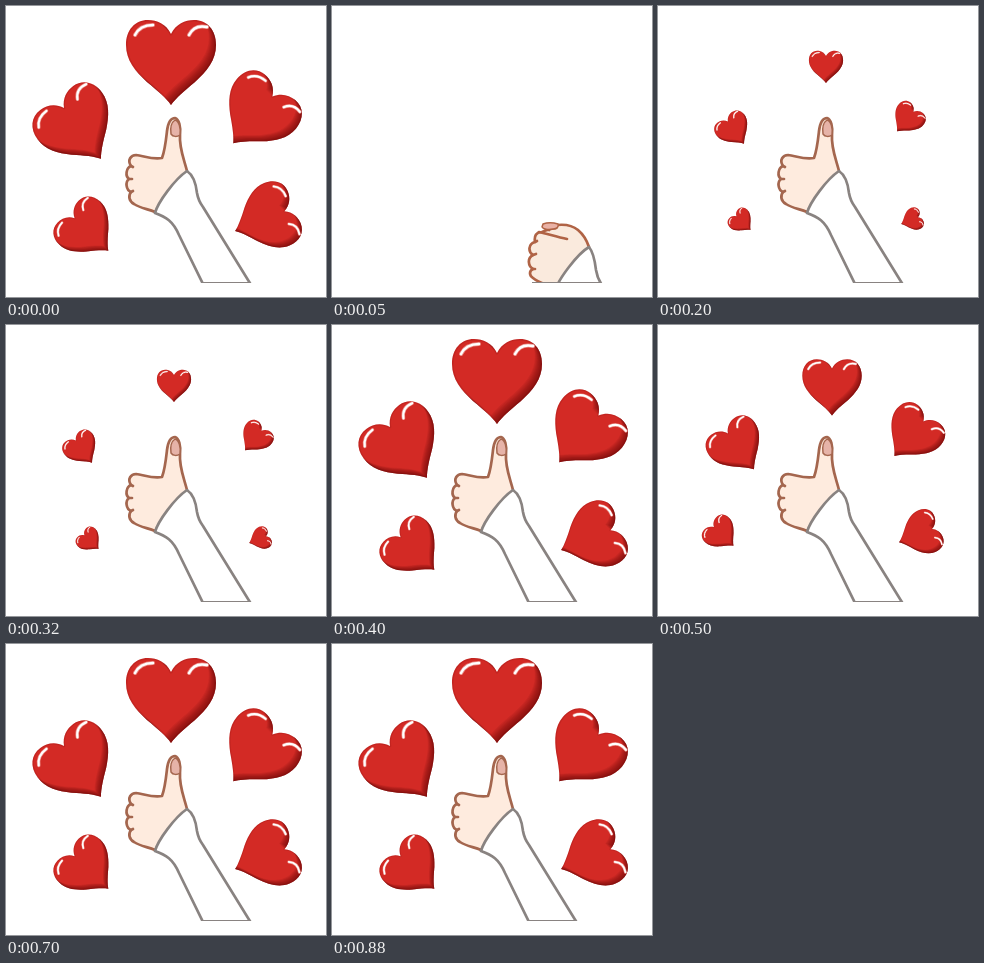
Animation of 320x291 px, one loop 1000 ms. Source, as an HTML page with a canvas:

```html
<!DOCTYPE html>
<html lang="en">
<head>
<meta charset="utf-8">
<title>Thumbs up with hearts</title>
<style>
html, body { margin: 0; width: 100%; height: 100%; overflow: hidden; background: #fff; }
canvas { display: block; width: 320px; height: 291px; }
</style>
</head>
<body>
<canvas id="stage" width="320" height="291"></canvas>
<script>
const ctx = document.getElementById('stage').getContext('2d');
const LOOP = 1000, FLOOR = 277;

// Hearts clockwise from the top: x, y, scale
const TILT = [0, 40, 68, -46, -36];
const BIG = [[165, 56, 1], [251, 109, .857], [259, 213, .75], [81.9, 225, .66], [72.6, 122, .885]];
const MEDIUM = [[174, 62, .66], [254, 110, .635], [261, 209.3, .5], [63.7, 209.5, .38], [80.2, 122.6, .625]];
const SMALL = [[168, 60.6, .38], [249, 113.4, .358], [253.4, 214, .255], [84, 215.8, .275], [76.3, 124.3, .385]];

const HEART = new Path2D('M0-28C5-38 14-42 23-42C36-42 45-32 45-17C45-2 36 9 24 20C13 29 5 36 0 43C-5 36-13 29-24 20C-36 9-45-2-45-17C-45-32-36-42-23-42C-14-42-5-38 0-28Z');
const SHINE = new Path2D('M-36-27C-33-33-27-37-18-37M18-27C21-33 27-37 36-35');

const THUMB = {
  skin: '#feebde', ink: '#a4664e', nail: '#e6b3a8', cuffInk: '#898381',
  hand: new Path2D('M149 206C142 203 134 202 128 198C123 195 122 190 125 186C120 184 119 176 123 173C119 170 120 162 125 160C121 154 125 149 130 149C138 150 147 154 156 152C159 144 160 134 161 125C162 117 165 112 169 112C173 113 175 121 174 129C173 142 178 153 181 165L168 185Z'),
  lines: new Path2D('M125 160L127 161M123 173L126 173M125 186L127 185'),
  nailPath: new Path2D('M169 114C173 115 175 122 174 129C171 131 167 131 165 128C164 121 166 116 169 114Z'),
  arm: new Path2D('M181 165C187 169 190 178 191 187C192 193 194 197 197 201L244.5 278H197L173 229C167 215 160 211 149 207C152 196 169 173 181 165Z'),
  base: [196, 243]
};

const FIST = {
  skin: '#faeadd', ink: '#b06345', nail: '#e9b1a5', cuffInk: '#898381',
  hand: new Path2D('M180 222C171 219 163 217 157 212C153 209 153 205 157 203C152 200 151 192 157 189C152 186 152 178 159 176C158 170 160 166 166 166C170 164 174 163 180 162L181 159C190 158 196 159 202 164C208 169 211 175 213 181L198 202Z'),
  lines: new Path2D('M163 166C172 168 181 171 191 173M157 203L159 203M157 189L160 188M159 176L161 175M168 162L173 164'),
  nailPath: new Path2D('M167 158C172 156 179 157 182 158C183 161 181 163 177 163C172 164 167 163 166 161Z'),
  arm: new Path2D('M213 181C218 187 219 196 220 204C221 210 223 215 226 219L264 278H220L199 239C194 230 189 227 180 223C182 214 201 188 213 181Z'),
  base: [219, 263]
};

// Each pose holds until the next one begins
const POSES = [
  { at: 0, hand: THUMB, hearts: BIG },
  { at: 50, hand: FIST, dx: 44, dy: 60, base: [200, 268] },
  { at: 100, hand: FIST },
  { at: 200, hand: THUMB, hearts: SMALL },
  { at: 400, hand: THUMB, hearts: BIG },
  { at: 500, hand: THUMB, hearts: MEDIUM },
  { at: 700, hand: THUMB, hearts: BIG }
];

function shape(path, fill, ink, width) {
  ctx.fillStyle = fill;
  ctx.strokeStyle = ink;
  ctx.lineWidth = width;
  ctx.fill(path);
  ctx.stroke(path);
}

function drawHand({ hand, dx = 0, dy = 0, base = hand.base }) {
  ctx.save();
  ctx.beginPath();
  ctx.rect(0, 0, 320, FLOOR);
  ctx.clip();
  ctx.translate(dx, dy);
  shape(hand.hand, hand.skin, hand.ink, 2.7);
  ctx.stroke(hand.lines);
  shape(hand.nailPath, hand.nail, hand.ink, 1.5);
  shape(hand.arm, '#fff', hand.cuffInk, 2.7);
  ctx.restore();
  ctx.fillStyle = hand.cuffInk;
  ctx.fillRect(base[0], FLOOR - 1, base[1] - base[0], 1);
}

// Darkens the rim facing away from a light at the upper left of the stage
function shadeHeart(angle) {
  ctx.save();
  ctx.clip(HEART);
  ctx.fillStyle = 'rgba(95, 0, 0, .09)';
  for (let d = 1; d <= 9; d++) {
    const rim = new Path2D();
    rim.rect(-80, -80, 160, 160);
    const shift = new DOMMatrix().rotate(-angle).translate(-d * .8, -d * .8).rotate(angle);
    rim.addPath(HEART, shift);
    ctx.fill(rim, 'evenodd');
  }
  ctx.strokeStyle = 'rgba(105, 0, 0, .15)';
  ctx.lineWidth = 3;
  ctx.stroke(HEART);
  ctx.restore();
}

function drawHeart([x, y, scale], i) {
  ctx.save();
  ctx.translate(x, y);
  ctx.rotate(TILT[i] * Math.PI / 180);
  ctx.scale(scale, scale);
  ctx.fillStyle = '#d32a25';
  ctx.fill(HEART);
  shadeHeart(TILT[i]);
  ctx.strokeStyle = '#ea8c86';
  ctx.lineWidth = 4;
  ctx.stroke(SHINE);
  ctx.strokeStyle = '#fff';
  ctx.lineWidth = 2.4;
  ctx.stroke(SHINE);
  ctx.restore();
}

function draw(now) {
  const t = now % LOOP;
  const pose = POSES.findLast(p => p.at <= t) || POSES[0];
  ctx.fillStyle = '#fff';
  ctx.fillRect(0, 0, 320, 291);
  drawHand(pose);
  (pose.hearts || []).forEach(drawHeart);
}

ctx.lineJoin = ctx.lineCap = 'round';
const start = performance.now();
function tick() {
  draw(performance.now() - start);
  requestAnimationFrame(tick);
}
tick();
</script>
</body>
</html>
```
